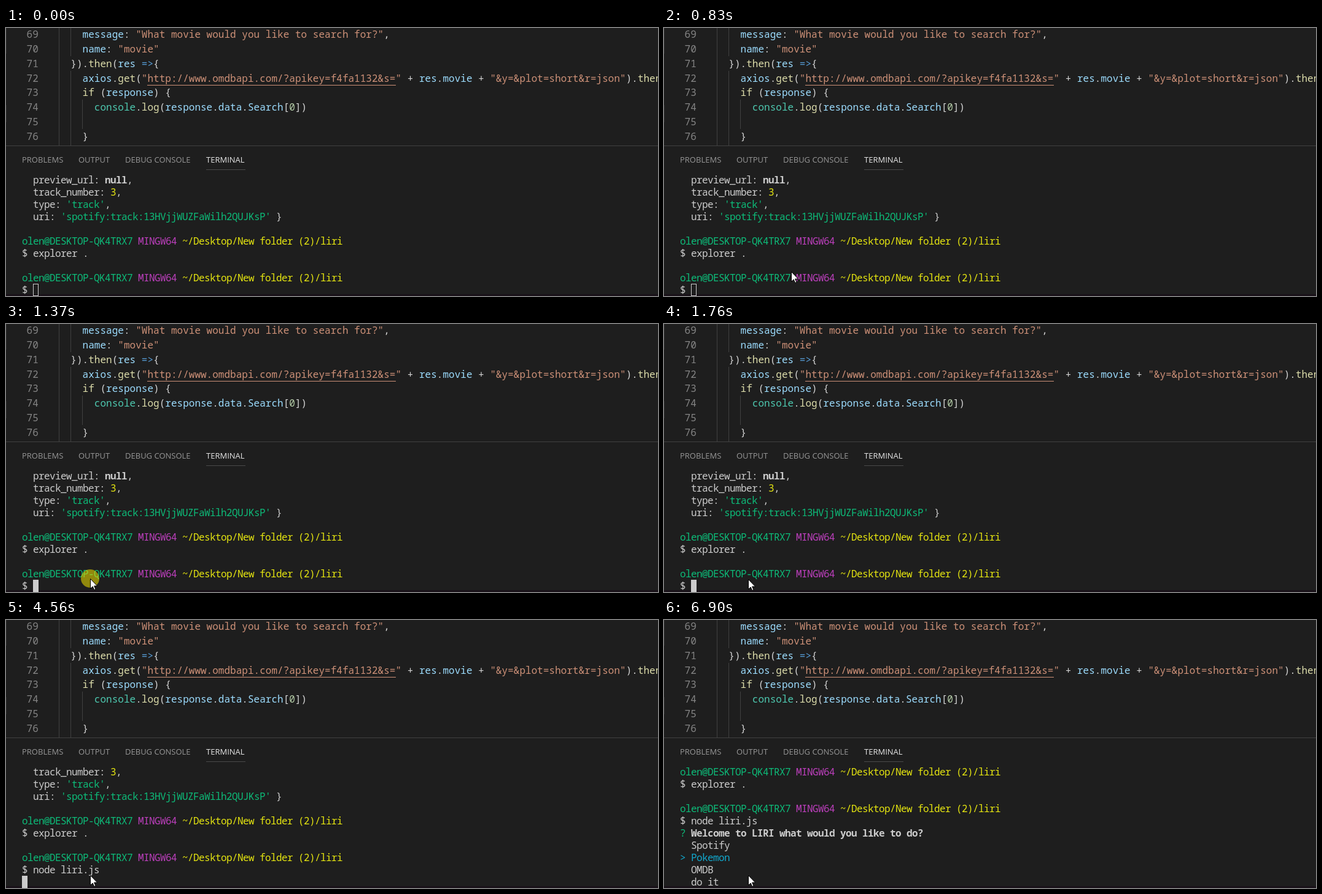
An HTML page with a canvas for the animation above (8 s loop, 1062 by 438 pixels).

```html
<!DOCTYPE html>
<html lang="en">
<head>
<meta charset="utf-8">
<title>Terminal session</title>
<style>
  html, body { margin: 0; width: 100%; height: 100%; overflow: hidden; background: #1e1e1e; }
  canvas { display: block; }
</style>
</head>
<body>
<canvas id="stage" width="1062" height="438"></canvas>
<script>
const ctx = document.getElementById('stage').getContext('2d');
const LOOP = 8000, WIDTH = 1062, HEIGHT = 438;
const MONO = '16px "Noto Sans Mono", "DejaVu Sans Mono", monospace';
const UI = '13px "Open Sans", "Noto Sans", sans-serif';

const code = {
  plain: '#d4d4d4', variable: '#9cdcfe', string: '#ce9178', method: '#dcdcaa',
  arrow: '#569cd6', object: '#4ec9b0', number: '#b5cea8'
};
const term = {
  text: '#cccccc', green: '#0dbc79', magenta: '#bc3fbc',
  yellow: '#e5e510', cyan: '#11a8cd', dim: '#b4b4b4'
};

// Editor metrics
const FIRST_LINE = 69, LINE = 23.75, CHAR = 9.62, CODE_X = 124.6;

// Each line: indent relative to CODE_X in characters, then [text, colour] spans
const editor = [
  [0, ['message', code.variable], [': ', code.plain],
    ['"What movie would you like to search for?"', code.string], [',', code.plain]],
  [0, ['name', code.variable], [': ', code.plain], ['"movie"', code.string]],
  [-2, ['}).', code.plain], ['then', code.method], ['(', code.plain], ['res ', code.variable],
    ['=>', code.arrow], ['{', code.plain]],
  [0, ['axios', code.variable], ['.', code.plain], ['get', code.method], ['(', code.plain],
    ['"http://www.omdbapi.com/?apikey=f4fa1132&s="', code.string], [' + ', code.plain],
    ['res', code.variable], ['.', code.plain], ['movie', code.variable], [' + ', code.plain],
    ['"&y=&plot=short&r=json"', code.string], [').', code.plain], ['then', code.method]],
  [0, ['if', code.method], [' (', code.plain], ['response', code.variable], [') {', code.plain]],
  [2, ['console', code.object], ['.', code.plain], ['log', code.method], ['(', code.plain],
    ['response', code.variable], ['.', code.plain], ['data', code.variable], ['.', code.plain],
    ['Search', code.variable], ['[', code.plain], ['0', code.number], ['])', code.plain]],
  [0],
  [0, ['}', code.plain]]
];

// Terminal metrics
const CELL = 9, ROW = 20, ROWS = 10, TERM_X = 26, TERM_Y = 238;

const prompt = [
  ['olen@DESKTOP-QK4TRX7 ', term.green], ['MINGW64 ', term.magenta],
  ['~/Desktop/New folder (2)/liri', term.yellow]
];
const history = [
  [['  preview_url: ', term.text], ['null', term.text, true], [',', term.text]],
  [['  track_number: ', term.text], ['3', term.yellow], [',', term.text]],
  [['  type: ', term.text], ["'track'", term.green], [',', term.text]],
  [['  uri: ', term.text], ["'spotify:track:13HVjjWUZFaWilh2QUJKsP'", term.green], [' }', term.text]],
  [],
  prompt,
  [['$ explorer .', term.text]],
  [],
  prompt
];
const choices = ['Spotify', 'Pokemon', 'OMDB', 'do it'];

const FOCUS = 1370, RELEASE = 1440, NUDGE = 1760;
const TYPED = 2630, ENTER = 4560, MENU = 5190, ARROW_DOWN = 6900;

// Pointer path: [time, x, y]
const path = [
  [500, 932, 426], [633, 570, 412], [766, 285, 400], [833, 207, 398],
  [966, 160, 406], [1100, 144, 413], [1230, 137, 416]
];

function drawGrid(spans, x, baseline, advance) {
  for (const [text, color, bold] of spans) {
    ctx.font = (bold ? 'bold ' : '500 ') + MONO;
    ctx.fillStyle = color;
    for (const char of text) {
      if (char !== ' ') ctx.fillText(char, x, baseline);
      x += advance;
    }
  }
}

function rect(x, y, w, h, color) {
  ctx.fillStyle = color;
  ctx.fillRect(x, y, w, h);
}

function drawEditor() {
  const guide = '#404040';
  rect(86, 0, 1, 192, guide);
  rect(105, 0, 1, 46, guide);
  rect(105, 70, 1, 122, guide);
  rect(124, 117, 1, 48, guide);
  rect(0, 0, 1, 42, '#2d2d2d');
  rect(0, 126, 1, 28, '#2d2d2d');

  editor.forEach(([indent, ...spans], i) => {
    const baseline = Math.round(16.4 + i * LINE);
    drawGrid([[String(FIRST_LINE + i), '#858585']], 33.6, baseline, CHAR);
    drawGrid(spans, CODE_X + indent * CHAR, baseline, CHAR);
  });
  rect(230, 93, 405, 1, code.string);
}

function drawTabs() {
  rect(0, 192, WIDTH, 1, '#414141');
  const tabs = [['PROBLEMS', 26], ['OUTPUT', 118], ['DEBUG CONSOLE', 194], ['TERMINAL', 326]];
  for (const [label, x] of tabs) {
    const active = label === 'TERMINAL';
    ctx.font = (active ? '500 ' : '') + UI;
    ctx.fillStyle = active ? '#e7e7e7' : '#979797';
    ctx.fillText(label, x, 220);
  }
  rect(326, 231, 64, 1, '#4a4a4a');
}

function terminalLines(t) {
  const lines = [...history, [['$ ' + (t < TYPED ? '' : 'node liri.js'), term.text]]];
  if (t >= MENU) {
    const selected = t < ARROW_DOWN ? 0 : 1;
    const question = [['? ', term.green], ['Welcome to LIRI what would you like to do? ', term.text, true]];
    if (selected === 0) question.push(['(Use arrow keys)', term.dim]);
    lines.push(question);
    choices.forEach((name, i) => lines.push(
      i === selected ? [['> ' + name, term.cyan]] : [['  ' + name, term.text]]));
  } else if (t >= ENTER) {
    lines.push([]);
  }
  return lines.slice(-ROWS);
}

function drawTerminal(t) {
  rect(0, 435, WIDTH, 3, '#191219');
  const lines = terminalLines(t);
  lines.forEach((spans, i) => drawGrid(spans, TERM_X, TERM_Y + i * ROW + 16, CELL));
  if (t >= MENU) return;

  const column = lines[ROWS - 1].reduce((sum, [text]) => sum + text.length, 0);
  const x = TERM_X + column * CELL, y = TERM_Y + (ROWS - 1) * ROW;
  if (t < FOCUS) {
    ctx.strokeStyle = term.text;
    ctx.lineWidth = 1;
    ctx.strokeRect(x + 0.5, y + 0.5, CELL - 1, ROW - 1);
  } else {
    rect(x, y, CELL, ROW, term.text);
  }
}

function pointerAt(t) {
  if (t >= NUDGE) return [137, 417];
  if (t >= 1230) return [137, 416];
  // The pointer is sampled about 15 times a second
  const sampled = 500 + Math.floor((t - 500 + 4) / 66.6) * 66.6;
  const next = Math.max(1, path.findIndex(p => p[0] > sampled));
  const [t0, x0, y0] = path[next - 1], [t1, x1, y1] = path[next];
  const k = (sampled - t0) / (t1 - t0);
  return [Math.round(x0 + (x1 - x0) * k), Math.round(y0 + (y1 - y0) * k)];
}

const arrow = new Path2D('M.5 .5V16.5L4.2 13L6.7 18.5L9 17.5L6.6 12.1H11.6Z');

function drawPointer(t) {
  if (t < 500) return;
  const [x, y] = pointerAt(t);
  if (t >= FOCUS && t < RELEASE) {
    ctx.fillStyle = 'rgba(240, 225, 0, 0.55)';
    ctx.beginPath();
    ctx.arc(x, y, 15, 0, Math.PI * 2);
    ctx.fill();
  }
  ctx.save();
  ctx.translate(x, y);
  ctx.fillStyle = '#fff';
  ctx.fill(arrow);
  ctx.strokeStyle = '#000';
  ctx.lineWidth = 1;
  ctx.stroke(arrow);
  ctx.restore();
}

function draw(t) {
  rect(0, 0, WIDTH, HEIGHT, '#1e1e1e');
  drawEditor();
  drawTabs();
  drawTerminal(t);
  drawPointer(t);
}

const start = performance.now();
function tick() {
  draw((performance.now() - start) % LOOP);
  requestAnimationFrame(tick);
}
tick();
</script>
</body>
</html>
```
